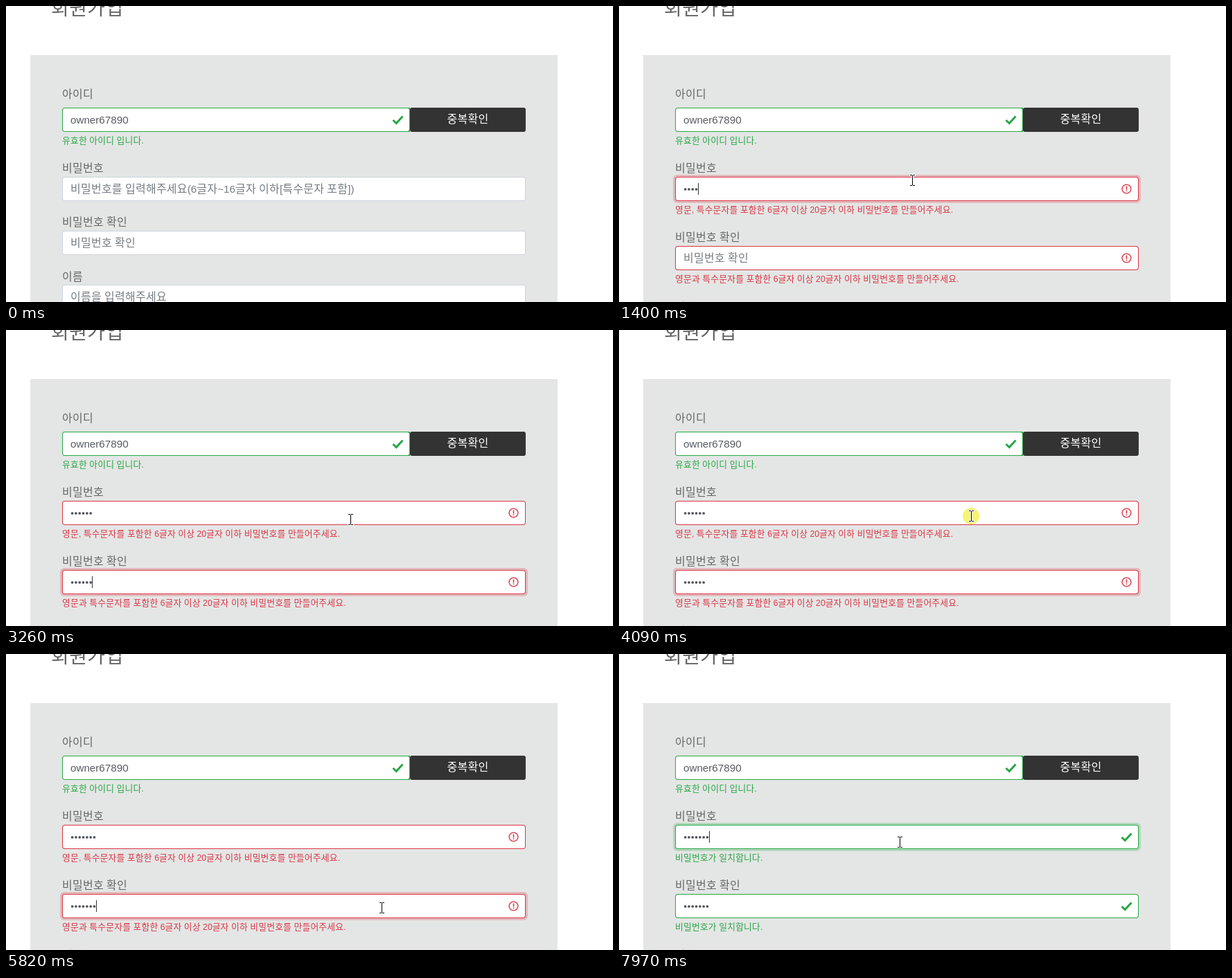
An HTML page with a canvas for the animation above (8 s loop, 876 px wide and 428 px high).

```html
<!DOCTYPE html>
<html lang="ko">
<head>
<meta charset="utf-8">
<title>회원가입</title>
<style>
  html, body { margin: 0; width: 100%; height: 100%; overflow: hidden; background: #fff; }
  canvas { display: block; }
</style>
</head>
<body>
<canvas id="stage" width="876" height="428"></canvas>
<script>
const ctx = document.getElementById('stage').getContext('2d');
const LOOP = 8000, TRAVEL = 350, HOLD = 150, KEY_STEP = 150, BLINK = 530;
const LEFT = 81, WIDTH = 669, HEIGHT = 35, INSET = 12, DOT_STEP = 5.3;
const GREEN = '#28a745', RED = '#dc3545', DARK = '#333', INK = '#666', HINT = '#747c83';
const BODY = 16, SMALL = 12.8;

// Places the pointer travels to; a stop with a focus value is a click.
const NONE = 0, PASSWORD = 1, CONFIRM = 2;
const stops = [
  { at: 70, x: 470, y: 368 },
  { at: 350, x: 423, y: 252, focus: PASSWORD },
  { at: 2030, x: 488, y: 371 },
  { at: 2290, x: 536, y: 365, focus: CONFIRM },
  { at: 3240, x: 497, y: 274 },
  { at: 4080, x: 508, y: 269, focus: PASSWORD },
  { at: 5400, x: 542, y: 367, focus: CONFIRM },
  { at: 6780, x: 485, y: 306, focus: NONE },
  { at: 7440, x: 405, y: 272, focus: PASSWORD }
];
const clicks = stops.filter(s => s.focus !== undefined);

const bursts = [
  { id: PASSWORD, start: 930, keys: 6 },
  { id: CONFIRM, start: 2460, keys: 6 },
  { id: PASSWORD, start: 5000, keys: 1 },
  { id: CONFIRM, start: 5810, keys: 1 }
];
const FIRST_KEY = bursts[0].start;
const MATCHED = bursts[3].start + 80;

const theme = {
  plain: { edge: '#ced4da', active: '#80bdff', glow: 'rgba(0,123,255,.25)' },
  bad: { edge: RED, active: RED, glow: 'rgba(220,53,69,.25)' },
  good: { edge: GREEN, active: GREEN, glow: 'rgba(40,167,69,.25)' }
};

function text(str, x, y, size, color) {
  ctx.fillStyle = color;
  for (const run of str.match(/[가-힣]+|[^가-힣]+/g)) {
    const korean = /[가-힣]/.test(run);
    ctx.font = korean
      ? `350 ${size}px "Noto Sans CJK KR", "Noto Sans CJK", sans-serif`
      : `${size * 0.95}px "Liberation Sans", Arial, sans-serif`;
    ctx.letterSpacing = (korean ? size * 0.015 : 0) + 'px';
    ctx.fillText(run, x, y);
    x += ctx.measureText(run).width;
  }
}

function roundBox(x, y, w, h, r, fill) {
  ctx.beginPath();
  ctx.roundRect(x, y, w, h, r);
  ctx.fillStyle = fill;
  ctx.fill();
}

function circle(x, y, r) {
  ctx.beginPath();
  ctx.arc(x, y, r, 0, Math.PI * 2);
}

function field(y, border, glow, w = WIDTH, radius = 4) {
  if (glow) roundBox(LEFT - 3, y - 3, w + 6, HEIGHT + 6, 6, glow);
  roundBox(LEFT, y, w, HEIGHT, radius, border);
  roundBox(LEFT + 1, y + 1, w - 2, HEIGHT - 2, 3, '#fff');
}

function check(x, y) {
  ctx.beginPath();
  ctx.moveTo(x - 7, y + 0.5);
  ctx.lineTo(x - 2.2, y + 5);
  ctx.lineTo(x + 7, y - 5);
  ctx.strokeStyle = GREEN;
  ctx.lineWidth = 3;
  ctx.stroke();
}

function alertIcon(x, y) {
  circle(x, y, 6.4);
  ctx.strokeStyle = ctx.fillStyle = RED;
  ctx.lineWidth = 1.4;
  ctx.stroke();
  ctx.fillRect(x - 0.8, y - 4, 1.6, 5);
  ctx.fillRect(x - 0.8, y + 2, 1.6, 1.6);
}

// Focus changes when the button is released.
function focusAt(t) {
  const last = clicks.filter(c => c.at + HOLD <= t).pop();
  return last ? { id: last.focus, since: last.at + HOLD } : { id: NONE, since: 0 };
}

function typedAt(t, id) {
  let count = 0, last = 0;
  for (const b of bursts.filter(b => b.id === id && b.start <= t)) {
    const n = Math.min(b.keys, Math.floor((t - b.start) / KEY_STEP) + 1);
    count += n;
    last = b.start + (n - 1) * KEY_STEP;
  }
  return { count, last };
}

function secretField(t, id, y, hint) {
  const focus = focusAt(t), typed = typedAt(t, id);
  const focused = focus.id === id;
  const state = t < FIRST_KEY ? 'plain' : t < MATCHED ? 'bad' : 'good';
  const look = theme[state], x = LEFT + INSET, mid = y + HEIGHT / 2;
  field(y, focused ? look.active : look.edge, focused && look.glow);

  if (!typed.count) text(hint, x, y + 23, BODY, HINT);
  ctx.fillStyle = '#495057';
  for (let i = 0; i < typed.count; i++) {
    circle(x + (i + 0.5) * DOT_STEP, mid + 0.5, 1.85);
    ctx.fill();
  }
  const idle = t - Math.max(focus.since, typed.last);
  if (focused && idle % (2 * BLINK) < BLINK) {
    ctx.fillStyle = DARK;
    ctx.fillRect(Math.floor(x + typed.count * DOT_STEP), y + 9, 1, 17);
  }
  if (state === 'bad') alertIcon(732.5, mid);
  if (state === 'good') check(732.5, mid);
}

function form(t) {
  const checked = t >= FIRST_KEY, good = t >= MATCHED;
  const shift = checked ? 22 : 0;

  ctx.fillStyle = '#e4e6e5';
  ctx.fillRect(35, 71, 761, 357);
  text('회원가입', 65, 13, 28, INK);

  text('아이디', LEFT, 133, BODY, INK);
  field(147, GREEN, null, 502, [4, 0, 0, 4]);
  text('owner67890', LEFT + INSET, 170, BODY, '#565c62');
  check(565.5, 164.5);
  roundBox(583, 147, 167, HEIGHT, 3, DARK);
  text('중복확인', 636.5, 169, BODY, '#fff');
  text('유효한 아이디 입니다.', LEFT, 198.5, SMALL, GREEN);

  text('비밀번호', LEFT, 240, BODY, INK);
  secretField(t, PASSWORD, 247, '비밀번호를 입력해주세요(6글자~16글자 이하[특수문자 포함])');

  text('비밀번호 확인', LEFT, 318 + shift, BODY, INK);
  secretField(t, CONFIRM, 325 + shift, '비밀번호 확인');

  if (checked) {
    const rule = ' 특수문자를 포함한 6글자 이상 20글자 이하 비밀번호를 만들어주세요.';
    ['영문,', '영문과'].forEach((head, i) => {
      const message = good ? '비밀번호가 일치합니다.' : head + rule;
      text(message, LEFT, 298.5 + i * 100, SMALL, good ? GREEN : RED);
    });
  }

  text('이름', LEFT, 397 + shift * 2, BODY, INK);
  field(403 + shift * 2, theme.plain.edge);
  text('이름을 입력해주세요', LEFT + INSET, 426 + shift * 2, BODY, HINT);
}

function pointerAt(t) {
  let { x, y } = stops[0];
  for (const s of stops.slice(1)) {
    const u = Math.min(1, Math.max(0, 1 - (s.at - t) / TRAVEL));
    const e = u * u * (3 - 2 * u);
    x += (s.x - x) * e;
    y += (s.y - y) * e;
  }
  return [Math.round(x), Math.round(y)];
}

function beam(x, y) {
  const bars = grow => {
    const bar = (a, b, w, h) => ctx.fillRect(a - grow, b - grow, w + 2 * grow, h + 2 * grow);
    bar(x, y - 7, 1, 14);
    for (const row of [y - 8, y + 7]) {
      bar(x - 3, row, 3, 1);
      bar(x + 1, row, 3, 1);
    }
  };
  ctx.fillStyle = '#fff';
  bars(1);
  ctx.fillStyle = '#000';
  bars(0);
}

const arrowShape = new Path2D('M.5 0v16l4-3.5 2.5 6 2.5-1-2.5-6h5z');

function arrow(x, y) {
  ctx.save();
  ctx.translate(x, y);
  ctx.fillStyle = '#fff';
  ctx.fill(arrowShape);
  ctx.strokeStyle = '#111';
  ctx.lineWidth = 1;
  ctx.stroke(arrowShape);
  ctx.restore();
}

function pointer(t) {
  if (t < stops[0].at) return;
  const [x, y] = pointerAt(t);
  if (clicks.some(c => t >= c.at && t < c.at + HOLD)) {
    circle(x, y, 12);
    ctx.fillStyle = 'rgba(244,242,88,.86)';
    ctx.fill();
  }
  const confirmTop = t < FIRST_KEY ? 325 : 347;
  const inside = [247, confirmTop].some(top => y >= top && y < top + HEIGHT);
  (inside ? beam : arrow)(x, y);
}

function draw() {
  const t = performance.now() % LOOP;
  ctx.fillStyle = '#fff';
  ctx.fillRect(0, 0, 876, 428);
  form(t);
  pointer(t);
  requestAnimationFrame(draw);
}
draw();
</script>
</body>
</html>
```
